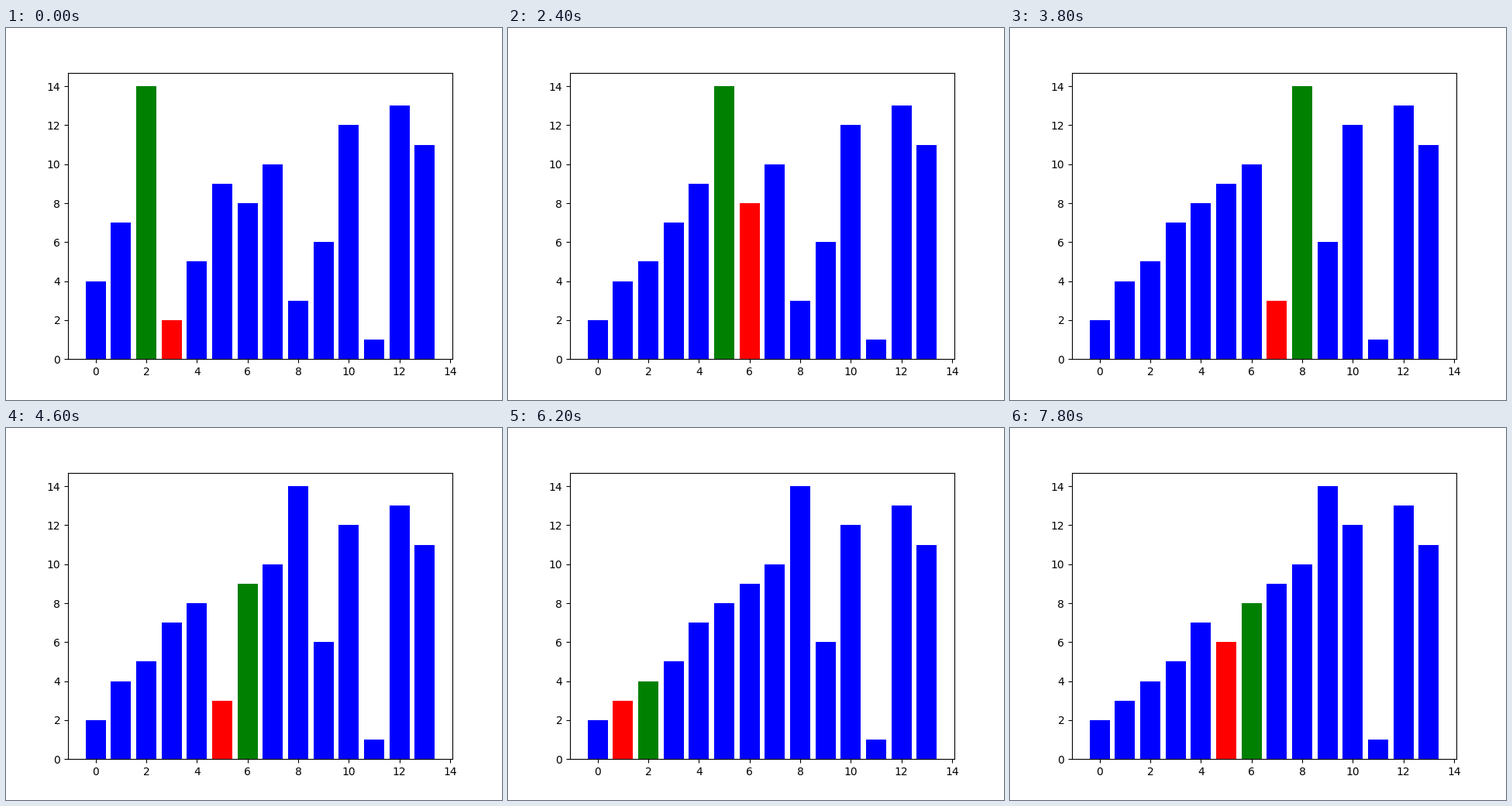
Write a matplotlib script that moves like this. It is 640 px wide and 480 px high and loops after 8 s.

```python
import matplotlib.pyplot as plt
from matplotlib.animation import FuncAnimation

VALUES = [4, 7, 14, 2, 5, 9, 8, 10, 3, 6, 12, 1, 13, 11]
FIRST_KEY = 3  # the three bars before it are already in order
FRAMES = 40
INTERVAL = 200


def insertion_steps(values, first):
    """Yield (heights, key index, neighbour index) before and after each swap."""
    a = list(values)
    for i in range(first, len(a)):
        j = i
        while j > 0 and a[j - 1] > a[j]:
            yield a[:], j, j - 1
            a[j - 1], a[j] = a[j], a[j - 1]
            yield a[:], j - 1, j
            j -= 1


steps = list(insertion_steps(VALUES, FIRST_KEY))[:FRAMES]

fig, ax = plt.subplots(figsize=(6.4, 4.8), dpi=100)
bars = ax.bar(range(len(VALUES)), VALUES, color="blue")


def draw(n):
    heights, key, other = steps[n]
    for i, (bar, height) in enumerate(zip(bars, heights)):
        bar.set_height(height)
        bar.set_color("red" if i == key else "green" if i == other else "blue")
        bar.set_linewidth(0)
    return list(bars)


def reset():
    return draw(0)


anim = FuncAnimation(fig, draw, frames=FRAMES, init_func=reset,
                     interval=INTERVAL, repeat=True, repeat_delay=0, blit=False)
plt.show()
```
